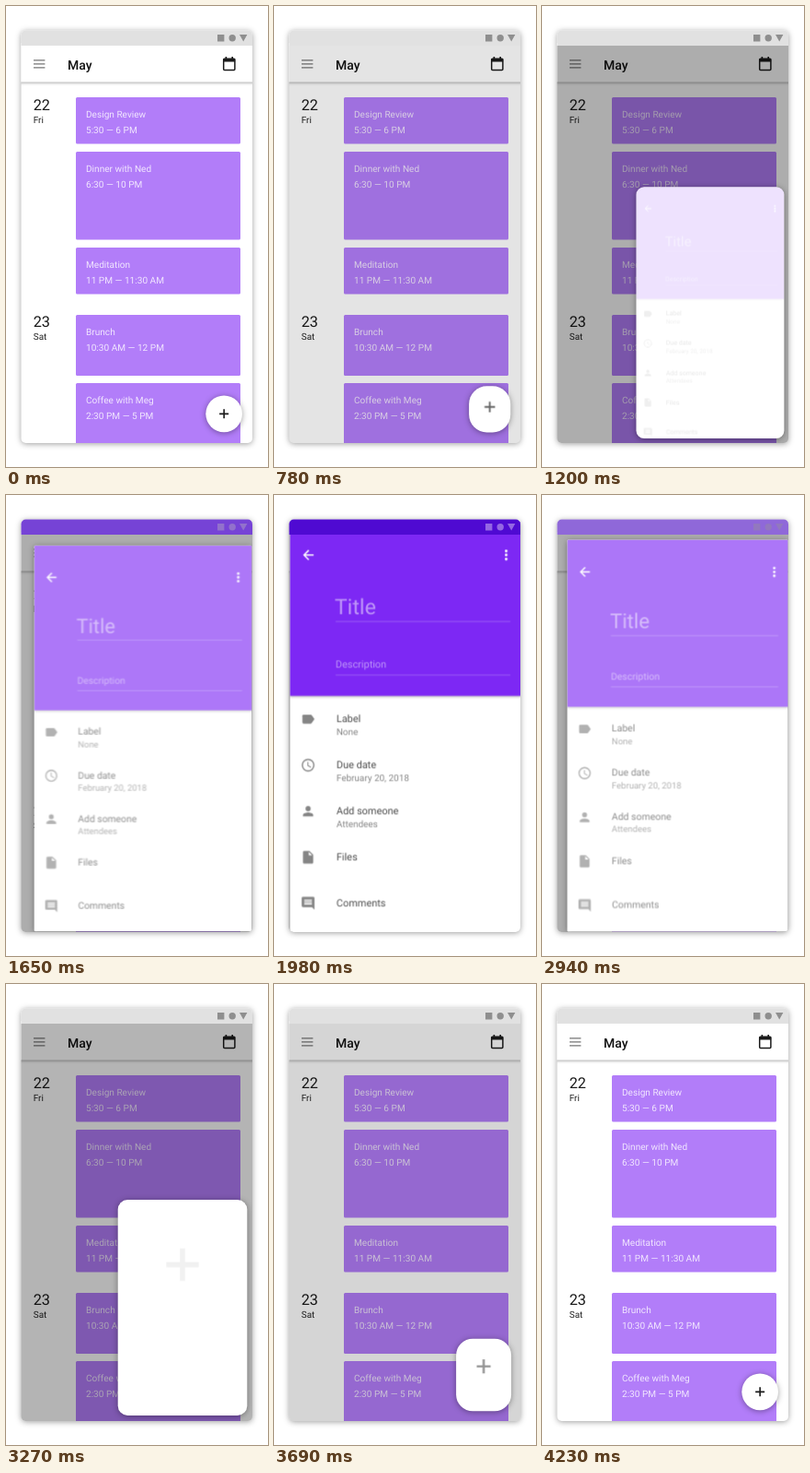
Recreate the animation shown at these times as an HTML page. Size 285x500 px, loop 4.86 s.

```html
<!DOCTYPE html>
<html lang="en">
<head>
<meta charset="utf-8">
<title>Calendar: button to form</title>
<style>
  html, body { margin: 0; height: 100%; overflow: hidden; background: #fff; }
  svg { display: block; width: 100vw; height: 100vh; font-family: Roboto, sans-serif; text-rendering: geometricPrecision; }
  .lift { filter: drop-shadow(0 1px 3px rgba(0, 0, 0, .38)); }
  .bar { filter: drop-shadow(0 1px 1.5px rgba(0, 0, 0, .35)); }
  .line { fill: none; stroke: currentColor; }
</style>
</head>
<body>
<svg viewBox="0 0 285 500">
  <defs>
    <clipPath id="screen"><rect x="16.5" y="26.5" width="251.5" height="447.5" rx="5"/></clipPath>
    <clipPath id="mask"><rect class="box"/></clipPath>
  </defs>
  <rect class="lift" x="16.5" y="26.5" width="251.5" height="447.5" rx="5" fill="#fff"/>
  <g clip-path="url(#screen)">
    <g id="agenda"></g>
    <rect class="bar" x="10" y="40" width="265" height="42.5" fill="#fff"/>
    <path class="line" color="#757575" stroke-width="1.3" d="M30 58.8h12.4M30 62.8h12.4M30 66.8h12.4"/>
    <text x="67" y="69" font-size="14" font-weight="500" fill="#111">May</text>
    <g color="#1a1a1a">
      <rect class="line" x="236.7" y="57.2" width="12.2" height="12.4" rx="1" stroke-width="1.5"/>
      <path class="line" stroke-width="1.6" d="M239.4 55v3M246.2 55v3"/>
      <path d="M236.5 57h12.6v3.6h-12.6z" fill="currentColor"/>
    </g>
    <rect id="scrim" x="16" y="43" width="253" height="432"/>

    <rect class="box lift" fill="#fff"/>
    <g clip-path="url(#mask)">
      <g id="form">
        <rect class="bar" x="16" y="26" width="252.5" height="190.5" fill="#6c0cf3"/>
        <g color="#fff">
          <path class="line" stroke-width="1.5" d="M42 63H31.5M36.7 57.8L31.5 63l5.2 5.2"/>
          <path class="line" stroke-width="3" stroke-linecap="round" d="M252.5 58.6h0M252.5 63h0M252.5 67.4h0"/>
          <path class="line" stroke-width="1" opacity=".25" d="M66 135.5h191M66 193.8h191"/>
        </g>
        <g fill="#fff" fill-opacity=".52">
          <text x="65" y="127.3" font-size="23.3">Title</text>
          <text x="66" y="186" font-size="11">Description</text>
        </g>
        <g id="rows"></g>
      </g>
      <path id="plus" class="line" color="#1a1a1a" stroke-width="1.6" d="M-5 0H5M0 -5V5"/>
    </g>

    <rect x="16" y="26" width="253" height="17" fill="#e1e1e1"/>
    <g fill="#8f8f8f"><use href="#status"/></g>
    <g id="tint">
      <rect x="16" y="26" width="253" height="17" fill="#4f0ad2"/>
      <g fill="#9467e3">
        <path id="status" d="M230 31h7.4v7.4H230zM242.5 34.7a3.7 3.7 0 0 0 7.4 0a3.7 3.7 0 0 0-7.4 0zM254 31h8.4l-4.2 7.4z"/>
      </g>
    </g>
  </g>
</svg>
<script>
const $ = id => document.getElementById(id);
const text = (x, y, size, fill, words) =>
  `<text x="${x}" y="${y}" font-size="${size}" fill="${fill}">${words}</text>`;

const events = [
  [99, 50.5, 'Design Review', '5:30 — 6 PM'],
  [158, 95.5, 'Dinner with Ned', '6:30 — 10 PM'],
  [262, 50.5, 'Meditation', '11 PM — 11:30 AM'],
  [335, 66, 'Brunch', '10:30 AM — 12 PM'],
  [409, 80, 'Coffee with Meg', '2:30 PM — 5 PM']
];
const days = [[113, '22', 'Fri'], [348, '23', 'Sat']];
$('agenda').innerHTML =
  events.map(([y, h, name, hours]) =>
    `<rect x="76" y="${y}" width="179" height="${h}" rx="1.5" fill="#b27df9"/>` +
    text(87, y + 22.3, 10.1, '#f1e6fe', name) +
    text(87, y + 39, 10.1, '#f1e6fe', hours)).join('') +
  days.map(([y, date, day]) =>
    text(29.7, y, 16.3, '#1a1a1a', date) + text(29.7, y + 14.3, 10, '#222', day)).join('');

// Icons are drawn on a 24 unit grid.
const rows = [
  ['Label', 'None', 'M3 7q0-2 2-2h11q1 0 1.6.8L22 12l-4.4 6.2q-.6.8-1.6.8H5q-2 0-2-2z'],
  ['Due date', 'February 20, 2018', 'M12 2a10 10 0 1 0 0 20a10 10 0 1 0 0-20zm0 2a8 8 0 1 1 0 16a8 8 0 1 1 0-16zM11 7h1.5v5.2l4.5 2.7-.8 1.2L11 13z'],
  ['Add someone', 'Attendees', 'M12 4a4 4 0 1 0 0 8a4 4 0 1 0 0-8zM12 14c-2.7 0-8 1.3-8 4v2h16v-2c0-2.7-5.3-4-8-4z'],
  ['Files', '', 'M4 4q0-2 2-2h8l6 6v12q0 2-2 2H6q-2 0-2-2zM13 3.5V9h5.5z'],
  ['Comments', '', 'M22 4q0-2-2-2H4Q2 2 2 4v12q0 2 2 2h14l4 4zM18 14H6v-2h12zM18 11H6V9h12zM18 8H6V6h12z']
];
$('rows').innerHTML = rows.map(([name, note, icon], i) => {
  const y = 245 + 50.2 * i;
  return `<path transform="translate(27.6 ${y - 11.6}) scale(.7)" fill="#757575" fill-rule="evenodd" d="${icon}"/>` +
    text(67, y, 11, '#333', name) + text(67, y + 14, 10, '#757575', note);
}).join('');

const clamp = v => Math.min(1, Math.max(0, v));
const ramp = (t, from, to) => clamp((t - from) / (to - from));
const mix = (a, b, p) => a + (b - a) * p;

// cubic-bezier(.4, 0, .2, 1), solved by bisection
function ease(t) {
  let low = 0, high = 1, s = .5;
  for (let i = 0; i < 24; i++) {
    s = (low + high) / 2;
    const r = 1 - s;
    if (1.2 * r * r * s + .6 * r * s * s + s ** 3 < t) low = s; else high = s;
  }
  return s * s * (3 - 2 * s);
}

const LOOP = 4860, STEP = 30, LENGTH = 1500, OPEN = 630, CLOSE = 2730;
const boxes = document.querySelectorAll('.box');

function render(ms) {
  const closing = ms >= CLOSE;
  const t = clamp((ms - (closing ? CLOSE : OPEN)) / LENGTH);
  const p = closing ? 1 - ease(t) : ease(t);
  const x = mix(217.3, 16.2, p), y = mix(422.5, 26.2, p);
  const width = mix(257, 268.2, p) - x, height = mix(462.2, 474.2, p) - y;

  for (const box of boxes) {
    const shape = { x, y, width, height, rx: 20 * (1 - p) };
    for (const key in shape) box.setAttribute(key, shape[key]);
  }
  const scale = width / 252;
  $('form').setAttribute('transform', `translate(${x} ${y}) scale(${scale}) translate(-16.2 -26.2)`);
  $('plus').setAttribute('transform', `translate(${x + width / 2} ${y + width / 2}) scale(${width / 39.7})`);

  const form = closing ? 1 - ramp(t, 0, .32) : ramp(t, .3, .98);
  $('form').setAttribute('opacity', form);
  $('plus').setAttribute('opacity', closing ? ramp(t, .32, 1) : 1 - ramp(t, 0, .3));
  $('tint').setAttribute('opacity', closing ? form : ramp(t, .39, .785));
  $('scrim').setAttribute('opacity', .32 * (closing ? 1 - ramp(t, .3, 1) : ramp(t, 0, .3)));
}

const start = performance.now();
function tick() {
  const ms = (performance.now() - start) % LOOP;
  render(Math.floor(ms / STEP) * STEP);
  requestAnimationFrame(tick);
}
tick();
</script>
</body>
</html>
```
